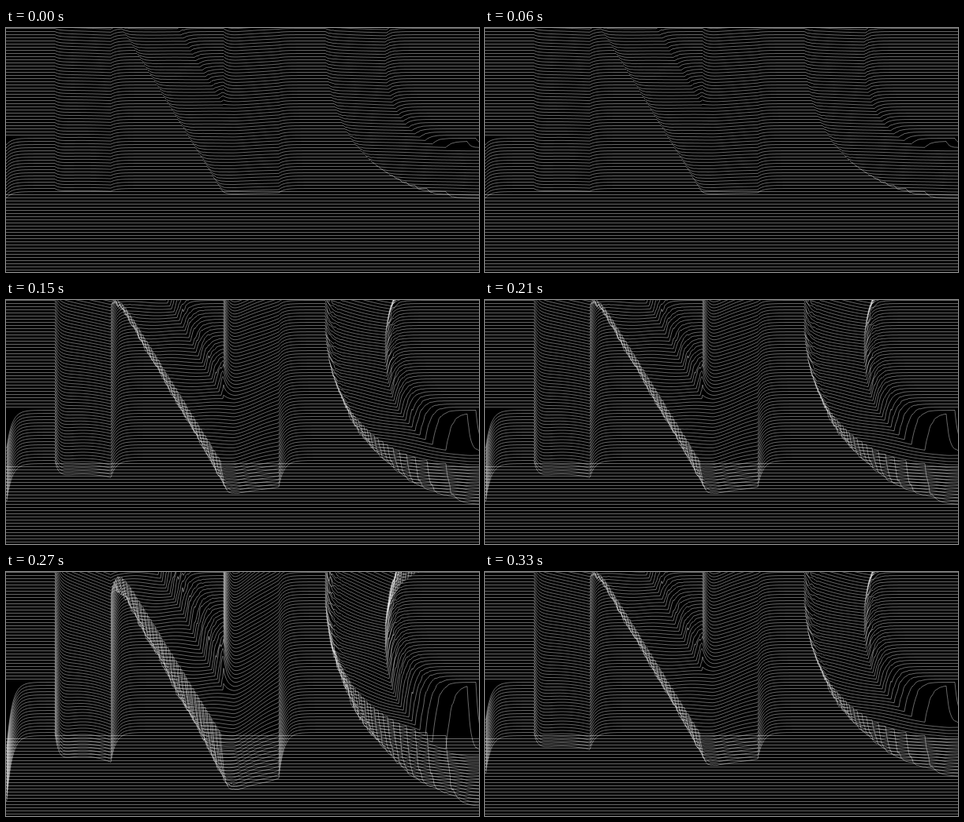
These frames come from a looping animation (600 px wide and 311 px high, 360 ms). An HTML page:

```html
<!DOCTYPE html>
<html lang="en">
<head>
<meta charset="utf-8">
<title>Line relief</title>
<style>
html, body { margin: 0; width: 100%; height: 100%; overflow: hidden; background: #000; }
svg { display: block; width: 600px; height: 311px; }
path { fill: none; stroke: #fff; stroke-opacity: .5; stroke-width: .8; stroke-linejoin: round; }
</style>
</head>
<body>
<svg id="stage" viewBox="0 0 600 311"></svg>
<script>
const GAP = 4, LAST = 308.5, ROWS = 104, STEP = 30;
const LOW = .095, MID = .575, HIGH = 1;
const BEAT = [LOW, MID, LOW, MID, LOW, MID, LOW, MID, LOW, HIGH, LOW, MID];

const clamp = v => Math.min(1, Math.max(0, v));
const mix = (a, b, t) => a + (b - a) * t;
const rnd = (a, b) => {
  const s = Math.sin(a * 12.9898 + b * 78.233) * 43758.5453;
  return s - Math.floor(s) - .5;
};
const oval = (x, y, cx, cy, a, b, n) =>
  Math.abs((x - cx) / a) ** n + Math.abs((y - cy) / b) ** n < 1;

// Which part of the lettering covers a point
function part(x, y) {
  if (x < 2) return y > 138 && y < 210 ? 'edge' : '';
  if (x < 350) {
    if (y > 205.5) return '';
    if (x >= 63 && x < 134) return 'stem';
    if (x >= 277 && x < 347) return 'post';
    const left = Math.max(134, 147 + .615 * y);
    return x >= left && x < Math.min(347, 220 + .6 * y) ? 'slash' : '';
  }
  if (x > 596 && y > 137 && y < 160) return 'bowl';
  return oval(x, y, 590, 15, 185, 195, 2.3) && !oval(x, y, 572, 30, 91, 115.3, 2.2) ? 'bowl' : '';
}

// How far down the line is pulled there at full strength
function depth(kind, x, y) {
  const v = clamp(y / 150);
  if (kind === 'edge') return 83;
  if (kind === 'stem') {
    const u = (x - 63) / 71;
    return mix(25 + 28 * u, 36 - 30 * u * (1 - u) + 4 * u, v);
  }
  if (kind === 'slash' || kind === 'post') {
    const fall = Math.max(0, x - 288) * mix(.7, .36, clamp((y - 90) / 110));
    return 46 + 30 * clamp(y / 205) - fall + 2 * Math.sin(x / 13 + y / 30);
  }
  if (kind === 'bowl') return 28 + 60 * clamp((x - 405) / 180) ** .8 + 2 * Math.sin(x / 17 + y / 21);
  return 0;
}

// Pull along one row: it trails its target from left to right
function pull(y, row) {
  const out = [];
  let d = 0, was = '', since = 99, rough = 0;
  for (let x = -30; x <= 601; x++) {
    const kind = part(x, y);
    if (!kind !== !was) {
      since = 0;
      const upright = x === 63 || x === 134 || x === 277 || x === 347 || x < 10;
      rough = upright ? 0 : 1;
    }
    was = kind;
    d += (depth(kind, x, y) - d) * (kind ? .2 : .14);
    const shake = rough * rnd(Math.floor(x / 3), row) * 18 * Math.exp(-since / 7) * clamp(since / 3);
    since++;
    if (x >= -1) out.push(Math.max(0, d + shake));
  }
  return out;
}

const svg = document.getElementById('stage');
const rows = Array.from({ length: ROWS }, (_, i) => {
  const y = LAST - i * GAP;
  const path = document.createElementNS('http://www.w3.org/2000/svg', 'path');
  svg.appendChild(path);
  return { y, path, pulls: pull(y, i), shapes: {} };
});

const shape = (row, k) => row.shapes[k] ||= 'M' + row.pulls
  .map((d, i) => `${i - 1} ${(row.y + d * k).toFixed(1)}`).join('L');

let shown;
function draw(ms) {
  const k = BEAT[Math.floor(ms / STEP) % BEAT.length];
  if (k === shown) return;
  shown = k;
  for (const row of rows) row.path.setAttribute('d', shape(row, k));
}

const start = performance.now();
function tick() {
  draw(performance.now() - start);
  requestAnimationFrame(tick);
}
draw(0);
requestAnimationFrame(tick);
</script>
</body>
</html>
```
